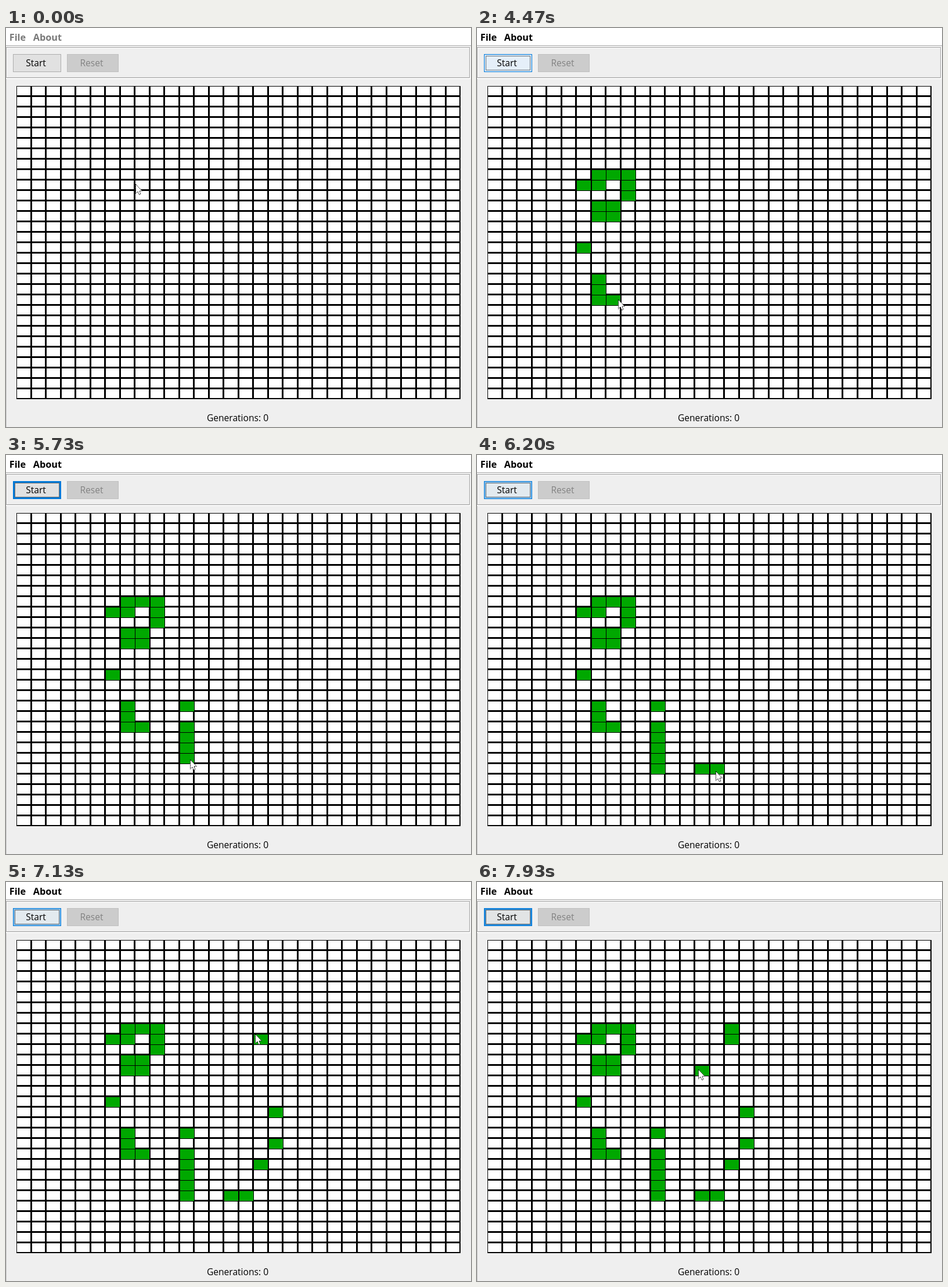
Recreate the animation shown at these times as an HTML page with a canvas. Size 801 by 688 pixels, loop 8 s.

```html
<!DOCTYPE html>
<html lang="en">
<head>
<meta charset="utf-8">
<title>Cell grid</title>
<style>
html, body { margin: 0; width: 100%; height: 100%; overflow: hidden; background: #efefef; }
canvas { display: block; width: 801px; height: 688px; }
</style>
</head>
<body>
<canvas id="stage" width="801" height="688"></canvas>
<script>
const ctx = document.getElementById('stage').getContext('2d');
const LOOP = 8000, TICKS = 120, ACTIVE = 67;
const COLS = 30, ROWS = 30, CELL_W = 25.5, CELL_H = 18, LINE = 1.5;
const FONT = '"Open Sans", "Noto Sans", sans-serif';

const gridX = c => 18 + CELL_W * c;
const gridY = r => 100 + CELL_H * r;
const snap = v => Math.ceil(v - .5);

// Pointer stops as [tick, column, row]; each one fills the cell under it
const stops = [[ACTIVE, 8.82, 20.45], [73, 11.75, 18.5]];
for (let i = 0; i < 5; i++) stops.push([79 + 2.1 * i, 11.73, 20.3 + i]);
stops.push(
  [91, 14.3, 24.6], [93, 15.4, 24.7], [98, 16.9, 21.55], [101, 17.9, 19.8],
  [104, 17.6, 16.5], [107, 16.12, 9.02], [110, 16.3, 8.5], [119, 14.24, 12.4]
);

function rect(color, x, y, w, h) {
  ctx.fillStyle = color;
  ctx.fillRect(x, y, w, h);
}

function frame(color, x, y, w, h, line = 1) {
  ctx.strokeStyle = color;
  ctx.lineWidth = line;
  ctx.strokeRect(x + line / 2, y + line / 2, w - line, h - line);
}

function text(str, x, y, color, font = '15.6px', align = 'center') {
  ctx.font = font + ' ' + FONT;
  ctx.textAlign = align;
  ctx.fillStyle = color;
  ctx.fillText(str, x, y);
}

function mix(a, b, f) {
  return `rgb(${a.map((v, i) => Math.round(v + (b[i] - v) * f))})`;
}

function drawChrome(active) {
  rect('#efefef', 0, 0, 801, 688);
  rect('#fff', 0, 0, 801, 32);
  rect('#a0a0a0', 0, 30, 801, 1);
  frame('#fff', 1, 34, 799, 54);
  frame('#a0a0a0', 0, 33, 799, 53);
  rect('#c8c8c8', 0, 88, 1, 600);
  const ink = active ? '#000' : '#7a7a7a';
  text('File', 5.7, 22, ink, 'bold 16.3px', 'left');
  text('About', 46.7, 22, ink, 'bold 16.3px', 'left');
  text('Generations: 0', 399, 678, '#000');
}

function button(label, x, w, fill, border, ink) {
  rect(fill, x, 45, w, 31);
  frame(border, x, 45, w, 31);
  text(label, x + w / 2 - 2, 66, ink);
}

function drawButtons(k) {
  button('Reset', 105, 89, '#ccc', '#bfbfbf', '#838383');
  if (k < ACTIVE) {
    button('Start', 12, 83, '#e1e1e1', '#adadad', '#000');
    return;
  }
  // The focused button glows on a two second pulse
  const hot = [229, 241, 251];
  const heat = .5 + .5 * Math.cos((k - 70) / 15 * Math.PI);
  button('Start', 12, 83, mix([225, 225, 225], hot, heat), '#0078d7', '#000');
  frame(mix([0, 120, 215], hot, heat), 13, 46, 81, 29, 2);
  ctx.setLineDash([1, 1]);
  frame('#000', 15, 48, 77, 25);
  ctx.setLineDash([]);
}

// Fills a cell, leaving a margin at its right and bottom edges
function fillCell(color, c, r, margin) {
  const x = snap(gridX(c) + LINE), y = snap(gridY(r) + LINE);
  rect(color, x, y, snap(gridX(c + 1) - margin) - x, snap(gridY(r + 1) - margin) - y);
}

function drawGrid() {
  rect('#000', gridX(0), gridY(0), COLS * CELL_W, ROWS * CELL_H);
  for (let r = 0; r < ROWS; r++)
    for (let c = 0; c < COLS; c++) fillCell('#fff', c, r, LINE);
}

function alive(c, r, w = 1, h = 1) {
  for (let i = 0; i < w * h; i++)
    fillCell('#00a800', c + i % w, r + Math.floor(i / w), 0);
}

function drawCells(k) {
  if (k < ACTIVE) return;
  alive(7, 8, 3);
  alive(6, 9, 2);
  alive(9, 9, 1, 2);
  alive(7, 11, 2, 2);
  alive(6, 15);
  alive(7, 18, 1, 3);
  for (const [at, c, r] of stops)
    if (k >= at) alive(Math.floor(c), Math.floor(r));
}

function pointerAt(k) {
  if (k < ACTIVE) {
    const f = Math.max(0, 1 - k / 2) ** 2;
    return [205 + 18 * f, 265 + 4 * f];
  }
  const i = Math.max(1, stops.findIndex(s => s[0] >= k));
  const [k0, c0, r0] = stops[i - 1], [k1, c1, r1] = stops[i];
  const f = (k - k0) / (k1 - k0);
  return [gridX(c0 + (c1 - c0) * f), gridY(r0 + (r1 - r0) * f)];
}

const arrow = new Path2D('M0 0V16L3.5 12.5L6 18L8.5 17L6.5 11.5H11Z');

function drawPointer(k) {
  const [x, y] = pointerAt(k);
  ctx.save();
  ctx.translate(Math.round(x) + .5, Math.round(y) + .5);
  ctx.fillStyle = '#fff';
  ctx.fill(arrow);
  ctx.strokeStyle = '#000';
  ctx.lineWidth = 1;
  ctx.setLineDash([2, 1]);
  ctx.stroke(arrow);
  ctx.restore();
}

function render(now) {
  let k = Math.floor((now % LOOP + 4) * TICKS / LOOP) % TICKS;
  // The first steps after activation run at half rate
  if (k >= ACTIVE && k < 73) k = (k - 1) | 1;
  drawChrome(k >= ACTIVE);
  drawButtons(k);
  drawGrid();
  drawCells(k);
  drawPointer(k);
}

const start = performance.now();
function tick() {
  render(performance.now() - start);
  requestAnimationFrame(tick);
}
tick();
</script>
</body>
</html>
```
